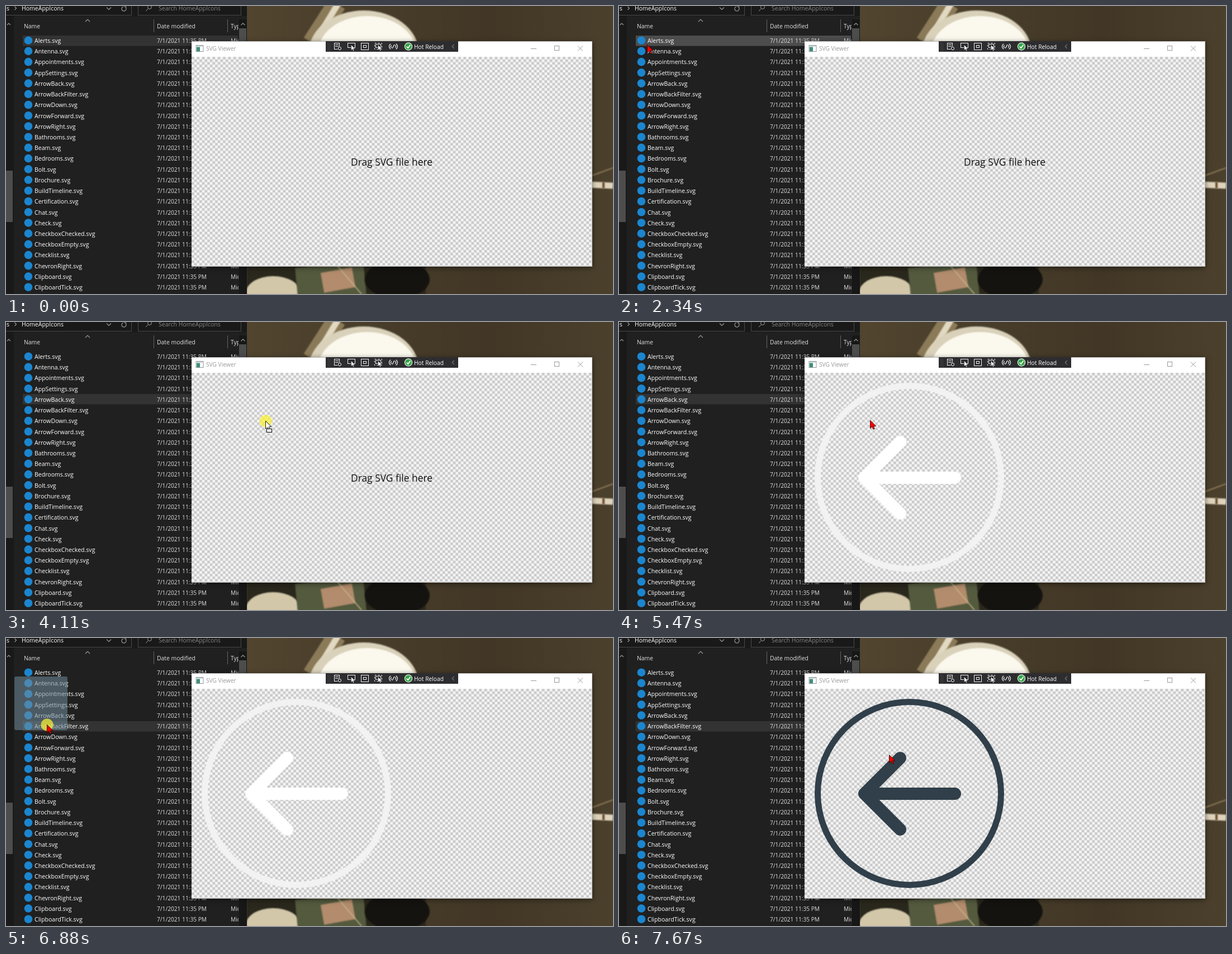
An HTML page with a canvas that plays this animation: 1086 px wide and 516 px high, repeating every 8 s.

```html
<!DOCTYPE html>
<html lang="en">
<head>
<meta charset="utf-8">
<title>SVG Viewer</title>
<style>
html, body { margin: 0; width: 100%; height: 100%; overflow: hidden; background: #202020; }
canvas { display: block; width: 1086px; height: 516px; }
</style>
</head>
<body>
<canvas id="stage" width="1086" height="516"></canvas>
<script>
const W = 1086, H = 516, LOOP = 8000, TAU = Math.PI * 2;
const FONT = '"Open Sans", "Noto Sans", sans-serif';
const FILES = ('Alerts Antenna Appointments AppSettings ArrowBack ArrowBackFilter ArrowDown ' +
  'ArrowForward ArrowRight Bathrooms Beam Bedrooms Bolt Brochure BuildTimeline Certification ' +
  'Chat Check CheckboxChecked CheckboxEmpty Checklist ChevronRight Clipboard ClipboardTick')
  .split(' ');
const ROW_H = 19.22, ROW_TOP = 52.5;
const VIEW = { x: 332, y: 63, w: 717, h: 404, bar: 28 };
const stage = document.getElementById('stage').getContext('2d');

function layer(draw) {
  const c = document.createElement('canvas');
  c.width = W;
  c.height = H;
  draw(c.getContext('2d'));
  return c;
}

function box(g, x, y, w, h, color) {
  g.fillStyle = color;
  g.fillRect(x, y, w, h);
}

function frame(g, x, y, w, h, color) {
  g.strokeStyle = color;
  g.lineWidth = 1;
  g.strokeRect(x, y, w, h);
}

function text(g, s, x, y, size, color) {
  g.font = `${size}px ${FONT}`;
  g.fillStyle = color;
  g.fillText(s, x, y);
}

function line(g, color, width, ...pts) {
  g.beginPath();
  for (let i = 0; i < pts.length; i += 2) g.lineTo(pts[i], pts[i + 1]);
  g.strokeStyle = color;
  g.lineWidth = width;
  g.stroke();
}

function ring(g, x, y, r, color, width, from = 0, to = TAU) {
  g.beginPath();
  g.arc(x, y, r, from, to);
  g.strokeStyle = color;
  g.lineWidth = width;
  g.stroke();
}

function blob(g, x, y, rx, ry, color, turn = 0) {
  g.beginPath();
  g.ellipse(x, y, rx, ry, turn, 0, TAU);
  g.fillStyle = color;
  g.fill();
}

// turn: 0 points up, 1 right, 2 down, 3 left
function chevron(g, x, y, size, turn, color) {
  g.save();
  g.translate(x, y);
  g.rotate(turn * Math.PI / 2);
  line(g, color, 1.1, -size, size / 2, 0, -size / 2, size, size / 2);
  g.restore();
}

// Soft desktop scenery behind the windows
function drawDesktop(g) {
  const sand = g.createLinearGradient(431, 0, W, 0);
  ['#51452f', '#483d2a', '#423726', '#4b402c'].forEach((c, i) => sand.addColorStop(i / 3, c));
  box(g, 431, 0, W - 431, H, sand);

  g.filter = 'blur(1px)';
  line(g, '#8b7a58', 34, 547, 66, 592, -4);
  line(g, '#e2d9c2', 11, 552, 66, 594, -4);
  blob(g, 640, 82, 98, 74, '#d9d1ba');
  blob(g, 646, 84, 88, 66, '#fbf8ee');

  box(g, 431, 462, 320, 54, '#2a271c');
  blob(g, 478, 512, 48, 28, '#d2c7a9');
  line(g, '#545a3e', 62, 520, 500, 642, 488);
  line(g, '#b28c6c', 36, 566, 496, 622, 486);
  blob(g, 700, 490, 58, 34, '#15130f');
  line(g, '#c9b98e', 1.5, 590, 462, 636, 516);
  line(g, '#ded3bb', 11, 1044, 320, W, 322);
  line(g, '#6b4a35', 11, 1067, 321, 1071, 321);
  line(g, '#8f7b59', 2, 1048, 304, W, 290);
  g.filter = 'none';
}

function drawExplorer(g) {
  const dim = '#9b9b9b', edge = '#4a4a4a', head = '#e0e0e0', thumb = '#4d4d4d';
  box(g, 0, 0, 431, H, '#202020');
  box(g, 0, 0, 431, 18, '#191919');
  box(g, 0, 18, 14, H, '#191919');
  box(g, 0, 295, 12, 92, thumb);
  box(g, 417, 24, 14, H, '#171717');
  box(g, 417, 40, 13, 120, thumb);
  frame(g, -2, -2, 226.5, 18.5, edge);
  frame(g, 236.5, -2, 184, 18.5, edge);

  chevron(g, 5, 32.5, 3, 0, dim);
  chevron(g, 424, 32.5, 3.5, 0, dim);
  chevron(g, 146, 26, 4, 0, dim);
  chevron(g, 17, 4, 3, 1, dim);
  chevron(g, 184, 4.5, 4, 2, dim);
  ring(g, 211, 5, 4, dim, 1.3, -0.6, 4.3);
  line(g, dim, 1.2, 211, 1, 214.5, 1, 214.5, 4);
  ring(g, 257, 2, 3.4, dim, 1);
  line(g, dim, 1, 254.6, 4.6, 250, 9);

  text(g, 'es', -5, 7.5, 10.5, '#fff');
  text(g, 'HomeAppIcons', 28, 7.5, 10.5, '#fff');
  text(g, 'Search HomeAppIcons', 273, 7.5, 10.5, '#858585');
  text(g, 'Name', 32, 39.5, 10.4, head);
  text(g, 'Date modified', 270, 39.5, 10.4, head);
  for (const x of [264, 396]) box(g, x, 24, 1, 23, '#636363');
}

function drawRows(g) {
  g.beginPath();
  g.rect(0, 24, 416, H);
  g.clip();
  text(g, 'Typ', 402, 39.5, 10.4, '#e0e0e0');
  FILES.forEach((name, i) => {
    const y = 62 + i * ROW_H;
    blob(g, 40, y - 0.3, 7.3, 7.3, '#1b86cf');
    text(g, name + '.svg', 51, y + 4, 10.55, '#fff');
    text(g, '7/1/2021 11:35 PM', 270, y + 4, 10.2, '#dedede');
    text(g, 'Mic', 402, y + 4, 10.2, '#dedede');
  });
  blob(g, 40, 62 + FILES.length * ROW_H, 7.3, 7.3, '#1b86cf');
}

function drawToolbar(g) {
  const ink = '#f1f1f1';
  box(g, 572, 63, 237, 19, '#2d2d30');
  for (let y = 66; y < 80; y += 3) {
    box(g, 576, y, 1, 1, '#666');
    box(g, 579, y + 1.5, 1, 1, '#666');
  }
  frame(g, 587.5, 66.5, 9, 11, ink);
  for (const y of [69.5, 72.5]) line(g, ink, 1, 589, y, 595, y);
  blob(g, 597, 76, 3.8, 3.8, '#2d2d30');
  ring(g, 597, 76, 2.6, ink, 1);

  frame(g, 611.5, 66.5, 13, 8, ink);
  drawPointer(g, 617, 69, ink, '#2d2d30', 0.7);
  frame(g, 635.5, 66.5, 13, 12, ink);
  frame(g, 639.5, 70.5, 5, 4, ink);
  g.setLineDash([3, 3]);
  frame(g, 659.5, 66.5, 13, 11, ink);
  g.setLineDash([]);
  frame(g, 661.5, 68.5, 9, 6, ink);
  drawPointer(g, 665, 69, ink, '#2d2d30', 0.7);

  for (const r of [2.5, 5.5]) {
    ring(g, 691, 72.5, r, ink, 1.2, TAU * 0.33, TAU * 0.67);
    ring(g, 695, 72.5, r, ink, 1.2, -TAU * 0.17, TAU * 0.17);
  }
  line(g, ink, 1.4, 691, 76, 695, 69);

  blob(g, 720, 72.5, 7.2, 7.2, '#e8f2e8');
  blob(g, 720, 72.5, 6, 6, '#37a447');
  line(g, '#fff', 1.7, 716.7, 72.5, 719.2, 75.3, 723.5, 69.5);
  text(g, 'Hot Reload', 730, 76.5, 10.3, '#fff');
  chevron(g, 800, 72.5, 3.5, 3, '#777');
}

function drawChecker(g, x, y, w, h) {
  const cell = 4.677;
  g.save();
  g.beginPath();
  g.rect(x, y, w, h);
  g.clip();
  box(g, x, y, w, h, '#f4f4f4');
  for (let r = 0; r * cell < h; r++)
    for (let c = r % 2; c * cell < w; c += 2)
      box(g, x + c * cell, y + r * cell, cell, cell, '#cbcbcb');
  g.restore();
}

function drawWindow(g) {
  const { x, y, w, h, bar } = VIEW, gray = '#999';
  g.shadowColor = 'rgba(0,0,0,.5)';
  g.shadowBlur = 9;
  g.shadowOffsetY = 2;
  box(g, x, y, w, h, '#fff');
  g.shadowColor = 'transparent';
  drawChecker(g, x, y + bar, w - 1, h - bar - 1);
  frame(g, x, y + 0.5, w - 0.5, h - 1, 'rgba(120,120,120,.5)');

  frame(g, 340, 70.5, 13, 11, '#8d9396');
  box(g, 340.5, 71, 12, 2, '#d0d5d8');
  box(g, 341, 73.5, 6, 7.5, '#3d8f78');
  text(g, 'SVG Viewer', 358, 80.3, 10.2, gray);
  line(g, gray, 1, 939, 76.5, 949, 76.5);
  frame(g, 981.5, 71.5, 8, 8, gray);
  for (const s of [-4.5, 4.5]) line(g, gray, 1, 1027.5 - s, 71.5, 1027.5 + s, 80.5);
  drawToolbar(g);
}

function drawArrow(g, circle, ink) {
  ring(g, 519.5, 278.5, 164, circle, 11);
  g.lineCap = g.lineJoin = 'round';
  line(g, ink, 22, 503, 215, 439, 279, 503, 343);
  line(g, ink, 22, 440, 279, 601, 279);
  g.lineCap = 'butt';
  g.lineJoin = 'miter';
}

const POINTER = new Path2D('M0 0V14.2L3.3 11.2 5.4 16 7.7 15 5.6 10.4 10.2 10.2Z');

function drawPointer(g, x, y, fill, edge, scale = 1) {
  g.save();
  g.translate(x + 0.5, y + 0.5);
  g.scale(scale, scale);
  g.fillStyle = fill;
  g.fill(POINTER);
  g.strokeStyle = edge;
  g.lineWidth = 0.9;
  g.stroke(POINTER);
  g.restore();
}

// Pointer moves: start, end, target x, target y
const MOVES = [
  [950, 1380, 103, 116], [1380, 1740, 41, 69], [1780, 1990, 50, 69],
  [2340, 2780, 33, 145], [3070, 3240, 35, 143], [3420, 4110, 464, 177],
  [5436, 5760, 6, 139], [6050, 6300, 73, 155], [6880, 7300, 483, 209]
];

function pointer(t) {
  let x = 567, y = 478;
  for (const [from, to, tx, ty] of MOVES) {
    if (t < from) break;
    const k = Math.min(1, (t - from) / (to - from));
    const ease = k * k * (3 - 2 * k);
    x += (tx - x) * ease;
    y += (ty - y) * ease;
  }
  return { x, y };
}

const between = (t, a, b) => t >= a && t < b;

function hoveredRow(t, p) {
  const slow = between(t, 1420, 3420) || between(t, 6100, 6730);
  return slow && p.x > 28 && p.x < VIEW.x ? Math.floor((p.y - ROW_TOP) / ROW_H) : -1;
}

const back = layer(g => { drawDesktop(g); drawExplorer(g); });
const rows = layer(drawRows);
const viewer = layer(drawWindow);

function render(t) {
  const g = stage, p = pointer(t);
  const selected = t < 3420 ? 0 : t < 6730 ? 4 : 5;
  const hover = hoveredRow(t, p);
  const dragging = between(t, 3420, 4700) || between(t, 6730, 7640);
  const dropping = dragging && p.x >= VIEW.x;

  g.drawImage(back, 0, 0);
  const mark = (row, color) => box(g, 30, Math.round(ROW_TOP + row * ROW_H), 385, 18.5, color);
  mark(selected, '#333');
  if (hover >= 0) mark(hover, '#4d4d4d');
  if (between(t, 1380, 1410)) box(g, 30, 129, 385, 1, '#4d4d4d');
  g.drawImage(rows, 0, 0);
  g.drawImage(viewer, 0, 0);

  if (t < 4700) text(g, 'Drag SVG file here', 617, 286, 17.4, '#111');
  else if (t < 7640) drawArrow(g, '#f2f2f2', '#fff');
  else drawArrow(g, '#303f49', '#303f49');

  if (t < MOVES[0][0]) return;
  if (dragging) {
    if (!dropping && p.x > 72 && !between(t, 6730, 6800)) {
      g.beginPath();
      g.roundRect(p.x - 58, p.y - 86, 95, 96, 3);
      g.fillStyle = 'rgba(112,138,155,.55)';
      g.fill();
    }
    blob(g, p.x + 0.5, p.y + 0.5, 11, 11, 'rgba(250,242,50,.72)');
  }
  drawPointer(g, p.x, p.y, dropping ? '#fff' : '#f00', dropping ? '#000' : '#3a0000');
  if (dropping) {
    box(g, p.x + 2, p.y + 14, 10, 7, '#fff');
    frame(g, p.x + 2.5, p.y + 14.5, 9, 6, '#000');
  }
}

const start = performance.now();
function tick() {
  render((performance.now() - start) % LOOP);
  requestAnimationFrame(tick);
}
tick();
</script>
</body>
</html>
```
